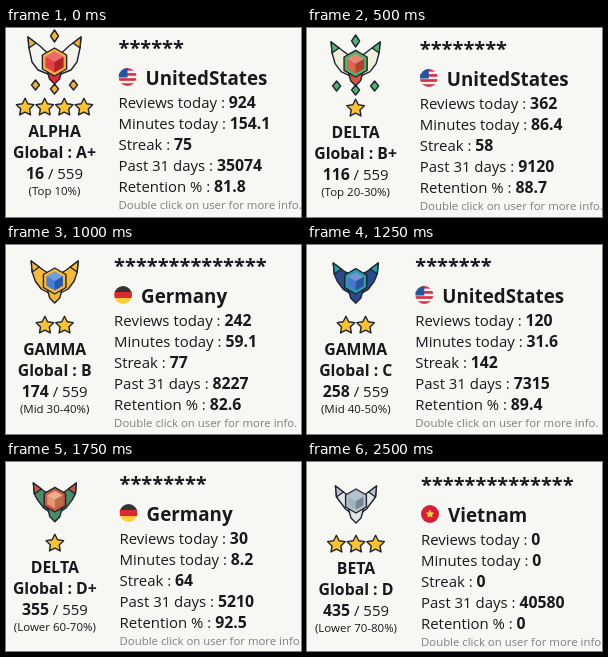
These frames come from a looping animation (295 px wide and 189 px high, 2.75 s). An HTML page:

```html
<!DOCTYPE html>
<html lang="en">
<head>
<meta charset="utf-8">
<style>
  html, body { margin: 0; width: 100%; height: 100%; overflow: hidden; background: #f7f7f3; }
  svg { display: block; width: 295px; height: 189px; }
  text { font: 14.95px "Open Sans", "Noto Sans", sans-serif; fill: #17191c; }
  .bold { font-size: 15.8px; font-weight: 700; }
  .name { font-size: 20px; font-weight: 700; }
  .country { font-size: 18.8px; font-weight: 700; }
  .range { font-size: 11.5px; }
  .hint { font-size: 11.38px; fill: #7c8081; }
  .mid { text-anchor: middle; }
</style>
</head>
<body>
<svg id="stage" viewBox="0 0 295 189"></svg>
<script>
const STEP = 250, TOTAL = 559;
const stage = document.getElementById('stage');
const range = (n, draw) => Array.from({ length: n }, (_, i) => draw(i));
const repeat = (n, draw) => range(n, draw).join('');

// Wing, trim and gem colours, best emblem first
const EMBLEMS = {
  ruby: ['#f4f3ee', '#f7b036', '#e02a32'],
  pearl: ['#f2f4f2', '#a9dfd6', '#9ccfc9'],
  forest: ['#f3efdc', '#4fb56c', '#d8553c'],
  gold: ['#f8b935', '#f8b935', '#2f72d6'],
  navy: ['#2b4a8c', '#23a0a8', '#3468c4'],
  copper: ['#4b8a6a', '#c9573f', '#e58a62'],
  silver: ['#dfe4e6', '#b6c2ca', '#93a9b8']
};
const STARS = { ALPHA: 4, BETA: 3, GAMMA: 2, DELTA: 1 };
const LABELS = ['Reviews today', 'Minutes today', 'Streak', 'Past 31 days', 'Retention %'];

// emblem, team, grade, rank, range, name length, country, values
const CARDS = [
  ['ruby', 'ALPHA', 'A+', 16, 'Top 10%', 6, 'UnitedStates', '924 154.1 75 35074 81.8'],
  ['pearl', 'BETA', 'A', 92, 'Top 10-20%', 13, 'UnitedArabEmirates', '455 54.3 91 20106 99.1'],
  ['forest', 'DELTA', 'B+', 116, 'Top 20-30%', 8, 'UnitedStates', '362 86.4 58 9120 88.7'],
  ['forest', 'DELTA', 'B+', 120, 'Top 20-30%', 3, 'Germany', '350 152.4 4 3754 90.3'],
  ['gold', 'GAMMA', 'B', 174, 'Mid 30-40%', 14, 'Germany', '242 59.1 77 8227 82.6'],
  ['navy', 'GAMMA', 'C', 258, 'Mid 40-50%', 7, 'UnitedStates', '120 31.6 142 7315 89.4'],
  ['navy', 'GAMMA', 'D+', 346, 'Lower 60-70%', 4, 'India', '37 11.1 1800 10395 97.3'],
  ['copper', 'DELTA', 'D+', 355, 'Lower 60-70%', 8, 'Germany', '30 8.2 64 5210 92.5'],
  ['copper', 'DELTA', 'D+', 364, 'Lower 60-70%', 4, 'Canada', '23 5.5 95 4486 100'],
  ['copper', 'DELTA', 'D', 412, 'Lower 70-80%', 9, 'UnitedStates', '5 1.4 12 3208 80.0'],
  ['silver', 'BETA', 'D', 435, 'Lower 70-80%', 14, 'Vietnam', '0 0 0 40580 0']
];

const polygon = (points, fill, attrs = '') =>
  `<polygon points="${points.join(' ')}" fill="${fill}" ${attrs}/>`;
const rect = (x, y, w, h, fill) =>
  `<rect x="${x}" y="${y}" width="${w}" height="${h}" fill="${fill}"/>`;
const text = (x, y, cls, body) => `<text x="${x}" y="${y}" class="${cls}">${body}</text>`;
const bold = body => `<tspan class="bold">${body}</tspan>`;
const bands = (...fills) => repeat(3, i => rect(-9, -9 + i * 6, 18, 6.1, fills[i]));
const ring = (n, x, y, radius) => range(n, i => {
  const a = i * 2 * Math.PI / n - Math.PI / 2, r = radius(i);
  return [x + r * Math.cos(a), y + r * Math.sin(a)];
});
const star = (x, y, r, fill) => polygon(ring(10, x, y, i => i % 2 ? r / 2 : r), fill);
const diamond = (x, y, w, h, fill) =>
  polygon([[x, y - h], [x + w, y], [x, y + h], [x - w, y]], fill);

const FLAGS = {
  UnitedStates: rect(-9, -9, 18, 18, '#f4f0f0')
    + repeat(4, i => rect(-9, -9 + i * 5.1, 18, 2.6, '#d62e43')) + rect(-9, -9, 9, 9.5, '#24569f'),
  UnitedArabEmirates: bands('#3f8a36', '#f3f3f1', '#333') + rect(-9, -9, 6, 18, '#d6263a'),
  Germany: bands('#333', '#d82a2f', '#fbce3b'),
  India: bands('#f6a13d', '#f4f4f2', '#3d9146') + '<circle r="2.2" fill="#3c6bb0"/>',
  Canada: rect(-9, -9, 18, 18, '#d6283b') + rect(-4.5, -9, 9, 18, '#f5f2f2') + star(0, 0, 4.5, '#d6283b'),
  Vietnam: rect(-9, -9, 18, 18, '#d71e38') + star(0, 0, 4.4, '#fbd436')
};

// Lower emblems get smaller, sit lower and lose their crystals.
function drawEmblem(name) {
  const [wing, trim, gem] = EMBLEMS[name];
  const level = Object.keys(EMBLEMS).indexOf(name);
  const span = 26.5 - level, top = 10 + level * 2, y = 35 + level / 3, r = 14 - level / 3;
  const feathers = [[5, y - 7], [span - 12, top + 9], [span, top], [span - 1, top + 11],
    [span - 4, y], [span - 10, y + 8], [4, y + 13]];
  const tip = [[span - 8, top + 6], [span, top], [span - 1, top + 11]];
  const side = polygon(feathers, wing) + polygon(tip, trim);
  const mirrored = body => body + `<g transform="scale(-1 1)">${body}</g>`;
  const hex = ring(6, 0, y, () => r - 3.5);
  const shades = ['#fff', '#000', '#fff'];
  const facets = repeat(3, i => polygon(
    [[0, y], hex[(2 * i + 5) % 6], hex[2 * i], hex[2 * i + 1]],
    shades[i], `stroke="none" opacity="${.3 - i * .1}"`));
  const crystals = level > 2 ? ''
    : diamond(0, 9 + level * 2, 4, 6, trim) + diamond(0, 62, 4, 5, trim)
      + mirrored(diamond(19, 58, 4, 5, trim));
  return mirrored(side)
    + polygon([[-8, y + 6], [8, y + 6], [5, y + 17], [0, y + 22], [-5, y + 17]], level < 3 ? gem : wing)
    + polygon(ring(6, 0, y, () => r), trim) + polygon(hex, gem, 'stroke="none"') + facets + crystals;
}

function drawCard(index) {
  const [emblem, team, grade, rank, percent, length, country, values] = CARDS[index];
  const wide = grade.length > 1 || percent.startsWith('Lower');
  const x = (wide ? 112.5 : 107.5) + index * .15;
  const dy = Math.round(index * index * .03 - .6);
  const cx = 48.5 + index * .05;
  const count = STARS[team];
  const stats = values.split(' ').map((v, i) =>
    text(x, 81 + i * 21, '', `${LABELS[i]} : ${bold(v)}`)).join('');
  return `<g transform="translate(0 ${dy})">
    <g stroke="#1d2430" stroke-width="1.4" stroke-linejoin="round">
      <g transform="translate(${cx} 0)">${drawEmblem(emblem)}</g>
      ${repeat(count, i => star(cx + (i - (count - 1) / 2) * 19.6, 80.5, 9.2, '#fcc32f'))}
    </g>
    ${text(cx, 110, 'bold mid', team)}
    ${text(cx, 131, 'bold mid', 'Global : ' + grade)}
    ${text(cx, 152, 'mid', `${bold(rank)} / ${TOTAL}`)}
    ${text(cx, 168, 'range mid', `(${percent})`)}
    ${text(x, 28, 'name', '*'.repeat(length))}
    <clipPath id="disc"><circle r="9"/></clipPath>
    <g transform="translate(${x + 9} 50)" clip-path="url(#disc)">${FLAGS[country]}</g>
    ${text(x + 27, 58, 'country', country)}
    ${stats}
    ${text(x, 182, 'hint', 'Double click on user for more info.')}
  </g>`;
}

let shown = -1;
function tick() {
  const index = Math.floor(performance.now() / STEP) % CARDS.length;
  if (index !== shown) stage.innerHTML = drawCard(shown = index);
  requestAnimationFrame(tick);
}
tick();
</script>
</body>
</html>
```
